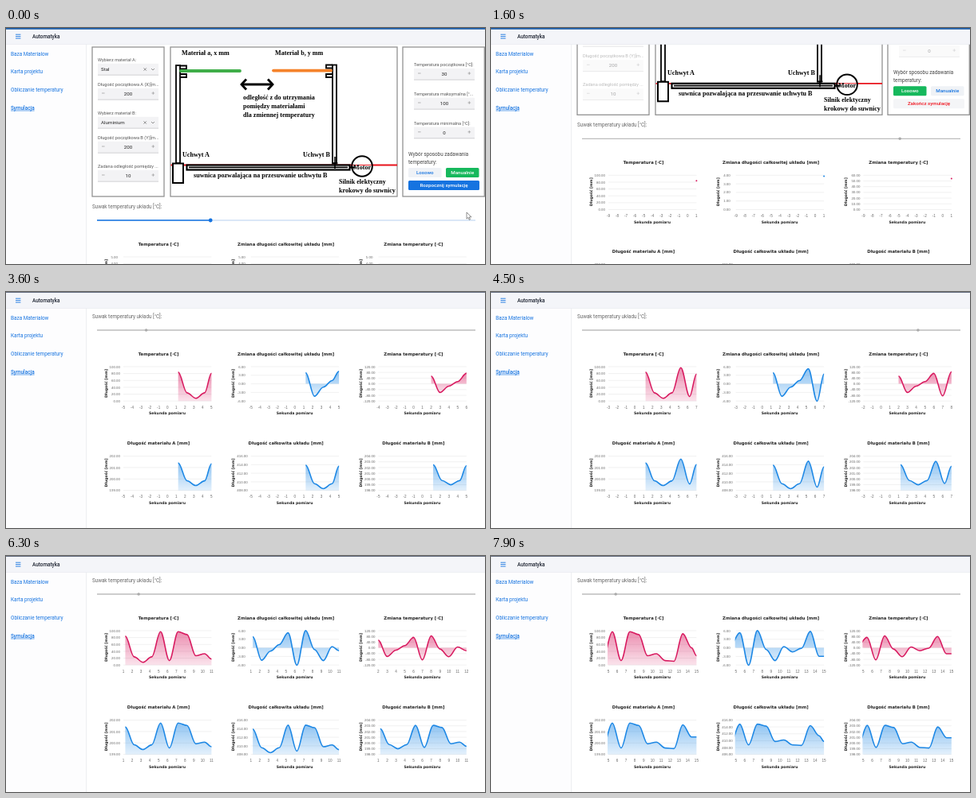
Write an HTML page that moves like this. It is 600x297 px and loops after 8 s.

```html
<!DOCTYPE html>
<html lang="pl">
<head>
<meta charset="utf-8">
<title>Automatyka</title>
<style>
html, body { margin: 0; width: 100%; height: 100%; overflow: hidden; background: #fff; }
svg { display: block; }
text { font-family: Roboto, sans-serif; white-space: pre; }
.draw text { font-family: "Liberation Serif", serif; font-weight: bold; }
.bold { font-family: "DejaVu Sans", sans-serif; font-weight: bold; }
.tick { font-family: "Liberation Sans", sans-serif; }
.mid { text-anchor: middle; }
.end { text-anchor: end; }
.med { font-weight: 500; }
</style>
</head>
<body>
<svg id="stage" width="600" height="297" viewBox="0 0 600 297"></svg>
<script>
const BLUE = '#1573e0', PINK = '#d81b60', LINE = '#1e88e5';
const MAX_SCROLL = 194, STEP = 450, START = 900;

const text = (x, y, s, size, fill = '#222', cls = '', extra = '') =>
  `<text x="${x}" y="${y}" font-size="${size}" fill="${fill}" class="${cls}" ${extra}>${s}</text>`;
const rect = (x, y, w, h, fill, extra = '') =>
  `<rect x="${x}" y="${y}" width="${w}" height="${h}" fill="${fill}" ${extra}/>`;
const path = (d, stroke, width, extra = '') =>
  `<path d="${d}" fill="none" stroke="${stroke}" stroke-width="${width}" ${extra}/>`;
const panel = (x, w) => rect(x, 24, w, 188, '#fff', 'stroke="#929292" stroke-width="1.3"');

// ---- forms ----
function field(x, y, label, value, isSelect) {
  const top = y + 2.8, mid = top + 7.2;
  const inner = isSelect
    ? text(x + 4, mid + 2.1, value, 6.2) +
      path(`M${x + 57.5} ${mid - 1.7}l3.4 3.4m0 -3.4l-3.4 3.4M${x + 67} ${mid - 1}l2 2l2 -2`, '#666', 0.7)
    : text(x + 38, mid + 2.2, value, 6.2, '#222', 'mid') +
      path(`M${x + 5} ${mid - 1}h3.6M${x + 67.5} ${mid - 1}h3.6m-1.8 -1.8v3.6`, '#888', 0.6);
  return text(x, y, label, 5.6, '#555') + rect(x, top, 76, 14.5, '#f3f3f5') +
    rect(x, top + 14, 76, 0.6, '#b5b5b8') + inner;
}

function button(x, y, w, label, fill, color) {
  return rect(x, y, w, 12, fill, 'rx="1.5"') + text(x + w / 2, y + 8.2, label, 6.2, color, 'mid med');
}

const leftForm =
  field(115, 42, 'Wybierz materiał A:', 'Stal', true) +
  field(115, 73, 'Długość początkowa A (X)[m...', 200) +
  field(115, 109, 'Wybierz materiał B:', 'Aluminium', true) +
  field(115, 140, 'Długość początkowa B (Y)[m...', 200) +
  field(115, 176, 'Zadana odległość pomiędzy ...', 10);
const rightForm =
  field(511, 48, 'Temperatura początkowa [°C]:', 30) +
  field(511, 85, 'Temperatura maksymalna [°...', 100) +
  field(511, 121.8, 'Temperatura minimalna [°C]:', 0);

// ---- machine drawing ----
const label = (x, y, s) => text(x, y, s, 8.1, '#000');
const drawing = '<g class="draw">' +
  path('M206.5 172.5H490', '#e8131b', 1.8) +
  rect(213, 47, 5, 123, '#fff', 'stroke="#000" stroke-width="1.8"') +
  rect(409, 46.5, 5, 124, '#fff', 'stroke="#000" stroke-width="1.8"') +
  path('M218 47.5h8v4h-8M218 58h8v4h-8M409 46.5h-8v4h8M409 58h-8v4h8', '#000', 1.8) +
  path('M219 54H293', '#3fae49', 3.8, 'stroke-linecap="round"') +
  path('M335 53.6H407', '#f5822a', 3.8, 'stroke-linecap="round"') +
  path('M296 71H333', '#000', 2.8) +
  path('M301 64.5L295 71L301 77.5M328 64.5L334 71L328 77.5', '#000', 2.8) +
  rect(209, 170.5, 13, 24.5, '#fff', 'stroke="#000" stroke-width="2"') +
  rect(226.5, 172.5, 204, 6, '#fff', 'stroke="#000" stroke-width="2.2"') +
  path('M229 175.4H428', '#000', 1.7) +
  path('M412 162V177M408.5 170h7', '#000', 1.6) +
  '<circle cx="446" cy="174" r="12.8" fill="#fff" stroke="#000" stroke-width="2"/>' +
  path('M430 175.4H437', '#000', 2.2) + path('M434 172.5H458', '#e8131b', 1) +
  label(220, 34, 'Materiał a, x mm') + label(337, 34, 'Materiał b, y mm') +
  label(297, 90, 'odległość z do utrzymania') + label(297, 101, 'pomiędzy materiałami') +
  label(297, 112, 'dla zmiennej temperatury') +
  label(221, 162, 'Uchwyt A') + label(372, 162, 'Uchwyt B') +
  label(235, 187.5, 'suwnica pozwalająca na przesuwanie uchwytu B') +
  label(435, 177.5, 'Motor') +
  label(417, 196, 'Silnik elektyczny') + label(417, 207, 'krokowy do suwnicy') + '</g>';

// ---- fixed frame ----
const links = ['Baza Materialow', 'Karta projektu', 'Obliczanie temperatury', 'Symulacja'];
const sidebar = rect(0, 20, 101, 277, '#fdfdfe') + rect(100.4, 20, 0.7, 277, '#e4e6ea') +
  links.map((s, i) => text(6, 34.6 + 22.7 * i, s, 6.4, BLUE, i == 3 ? 'med' : '',
    i == 3 ? 'text-decoration="underline"' : '')).join('');
const header = rect(0, 0, 600, 20.5, '#f4f5f9') + rect(0, 20, 600, 0.6, '#e6e8ee') +
  path('M12 8.2h6.4M12 10.6h6.4M12 13h6.4', BLUE, 0.9) + text(33, 13, 'Automatyka', 6.4, '#1d2330', 'med');

document.getElementById('stage').innerHTML = `
  <defs>${[PINK, LINE].map((c, i) => `<linearGradient id="fade${i}" x2="0" y2="1">
    <stop stop-color="${c}" stop-opacity=".5"/><stop offset="1" stop-color="${c}" stop-opacity=".12"/>
  </linearGradient>`).join('')}</defs>
  <g id="page">${panel(108, 90)}${panel(206, 284)}${panel(497, 102.3)}
    <g id="forms">${leftForm}${rightForm}</g>${drawing}
    ${text(504, 161, 'Wybór sposobu zadawania', 6.3, '#444')}${text(504, 170.5, 'temperatury:', 6.3, '#444')}
    ${text(108, 226.5, 'Suwak temperatury układu [°C]:', 6.3, '#666')}
    <g id="live"></g></g>
  ${sidebar}${header}<g id="top"></g>`;
const [page, forms, live, topLayer] = ['page', 'forms', 'live', 'top'].map(id => document.getElementById(id));

// ---- simulation ----
const temps = [30, 84, 24, 8, 23.8, 97, 13, 97, 88.8, 27, 33, 13, 11, 91, 50, 8.9];
const rise = k => temps[k] - 30;
const change = k => temps[k] - temps[k - 1];
// scales: [first step, low, high, intervals]
const charts = [
  { title: 'Temperatura [·C]', value: k => temps[k], scales: [[1, 0, 100, 5]], pink: true },
  { title: 'Zmiana długości całkowitej układu [mm]', value: k => 0.072 * change(k),
    scales: [[1, 0, 4, 4], [2, -6, 4, 5], [5, -6, 6, 4]] },
  { title: 'Zmiana temperatury [·C]', value: change, pink: true, lead: 20,
    scales: [[1, 0, 60, 6], [2, -60, 60, 4], [5, -120, 120, 6]] },
  { title: 'Długość materiału A [mm]', value: k => 200 + 0.026 * rise(Math.min(k, 14)), scales: [[1, 199, 202, 3]] },
  { title: 'Długość całkowita układu [mm]', value: k => 410 + 0.072 * rise(k),
    scales: [[1, 408, 416, 4], [15, 406, 416, 5]] },
  { title: 'Długość materiału B [mm]', value: k => 200 + 0.046 * rise(Math.min(k, 14)),
    scales: [[1, 198, 203, 5], [5, 198, 204, 6]] },
];
const stepAt = t => Math.max(0, Math.floor((t - 1370) / STEP) + 1);

function chart(c, i, t) {
  const W = 110.4, H = 43.2, x0 = 147 + 159.7 * (i % 3), y0 = 288 + 112.5 * (i > 2);
  const now = t + (c.lead || 0), n = stepAt(now);
  const [, low, high, count] = c.scales.filter(s => s[0] <= n).pop() || [0, 0, 5, 5];
  const yOf = v => H * (high - v) / (high - low);
  const labelX = n && i != 1 ? -4 : -7;
  let out = text(44, -14.5, c.title, 5.3, '#222', 'bold mid') +
    text(0, 0, 'Długość [mm]', 4.6, '#222', 'bold mid', 'transform="translate(-20.5 21)rotate(-90)"') +
    text(55, 60.3, 'Sekunda pomiaru', 4.65, '#222', 'bold mid');
  for (let j = 0; j <= count; j++) {
    const y = H * j / count;
    out += path(`M0 ${y}H${W}`, '#e2e2e2', 0.5) +
      text(labelX, y + 1.6, (high - (high - low) * j / count).toFixed(2), 4.4, '#666', 'tick end');
  }
  for (let j = 0; j <= 10; j++) out += text(W * j / 10, 52.8, n - 10 + j, 4.6, '#666', 'tick mid');

  const color = c.pink ? PINK : LINE;
  if (n == 1) out += `<circle cx="${W}" cy="${yOf(c.value(1))}" r="1" fill="${color}"/>`;
  if (n > 1) {
    // the newest point grows out of the previous one while the curve slides left
    const u = 1 - Math.exp(-((now - 1370) % STEP) / 285);
    const points = [];
    for (let k = 1; k < n; k++) points.push([W - (n - k - 1 + u) * W / 10, yOf(c.value(k))]);
    const prev = c.value(n - 1);
    points.push([W, yOf(prev + (c.value(n) - prev) * u)]);
    let d = `M${points[0]}`;
    for (let k = 1; k < n; k++) {
      const [ax, ay] = points[k - 1], [bx, by] = points[k], h = (bx - ax) * 0.35;
      d += `C${ax + h} ${ay} ${bx - h} ${by} ${bx} ${by}`;
    }
    const base = yOf(Math.max(low, Math.min(0, high)));
    out += `<svg x="-1" y="-4" width="${W + 2}" height="${H + 8}"><g transform="translate(1 4)">
      <path d="${d}V${base}H${points[0][0]}Z" fill="url(#fade${c.pink ? 0 : 1})"/>
      ${path(d, color, 1.6)}</g></svg>`;
  }
  return `<g transform="translate(${x0} ${y0})">${out}</g>`;
}

function slider(t, running) {
  const x = 114 + 4.74 * temps[stepAt(t + 30)], y = 242;
  return running
    ? path(`M114 ${y}H588`, '#bdbdbd', 1.3) + `<circle cx="${x}" cy="${y}" r="1.8" fill="#aaa"/>`
    : path(`M114 ${y}H588`, '#b5cff0', 1.2) + path(`M114 ${y}H${x}`, BLUE, 1.4) +
      `<circle cx="${x}" cy="${y}" r="2.4" fill="${BLUE}"/>`;
}

function buttons(random, running) {
  const mode = (x, s, on) => button(x, 176, 41.5, s, on ? '#16b85c' : '#eff2f6', on ? '#fff' : BLUE);
  return mode(504, 'Losowo', random) + mode(551, 'Manualnie', !random) +
    (running ? button(504, 192, 89, 'Zakończ symulację', '#f4f5f7', '#f0141e')
             : button(504, 192, 89, 'Rozpocznij symulację', BLUE, '#fff'));
}

const smooth = (a, b, t) => {
  const u = Math.max(0, Math.min(1, (t - a) / (b - a)));
  return u * u * (3 - 2 * u);
};

// pointer stops: [time, x, y]
const stops = [[50, 577, 232], [400, 526, 182], [550, 526, 182], [820, 550, 198], [950, 550, 198], [1280, 603, 215]];
function pointer(t) {
  if (t > 1280) return '';
  let [, x, y] = stops[0];
  for (let i = 1; i < stops.length; i++) {
    const a = stops[i - 1], b = stops[i], u = smooth(a[0], b[0], t);
    x += (b[1] - a[1]) * u;
    y += (b[2] - a[2]) * u;
  }
  return `<path d="M${x} ${y}v8.2l1.9 -1.8l1.3 3l1.3 -.6l-1.3 -2.9h2.7z" fill="#fff" stroke="#444" stroke-width=".6"/>`;
}

function frame(ms) {
  const t = ms % 8000, running = t >= START;
  page.setAttribute('transform', `translate(0 ${-MAX_SCROLL * smooth(1310, 1870, t)})`);
  forms.setAttribute('opacity', running ? 0.4 : 1);
  live.innerHTML = buttons(t >= 480, running) + slider(t, running) +
    charts.map((c, i) => chart(c, i, t)).join('');
  topLayer.innerHTML = (t < 1900 ? rect(0, 0, 600, 1.8, '#1f5fa9') : rect(0, 0, 600, 1, '#697184')) + pointer(t);
}

const begin = performance.now();
(function loop() {
  frame(performance.now() - begin);
  requestAnimationFrame(loop);
})();
</script>
</body>
</html>
```
